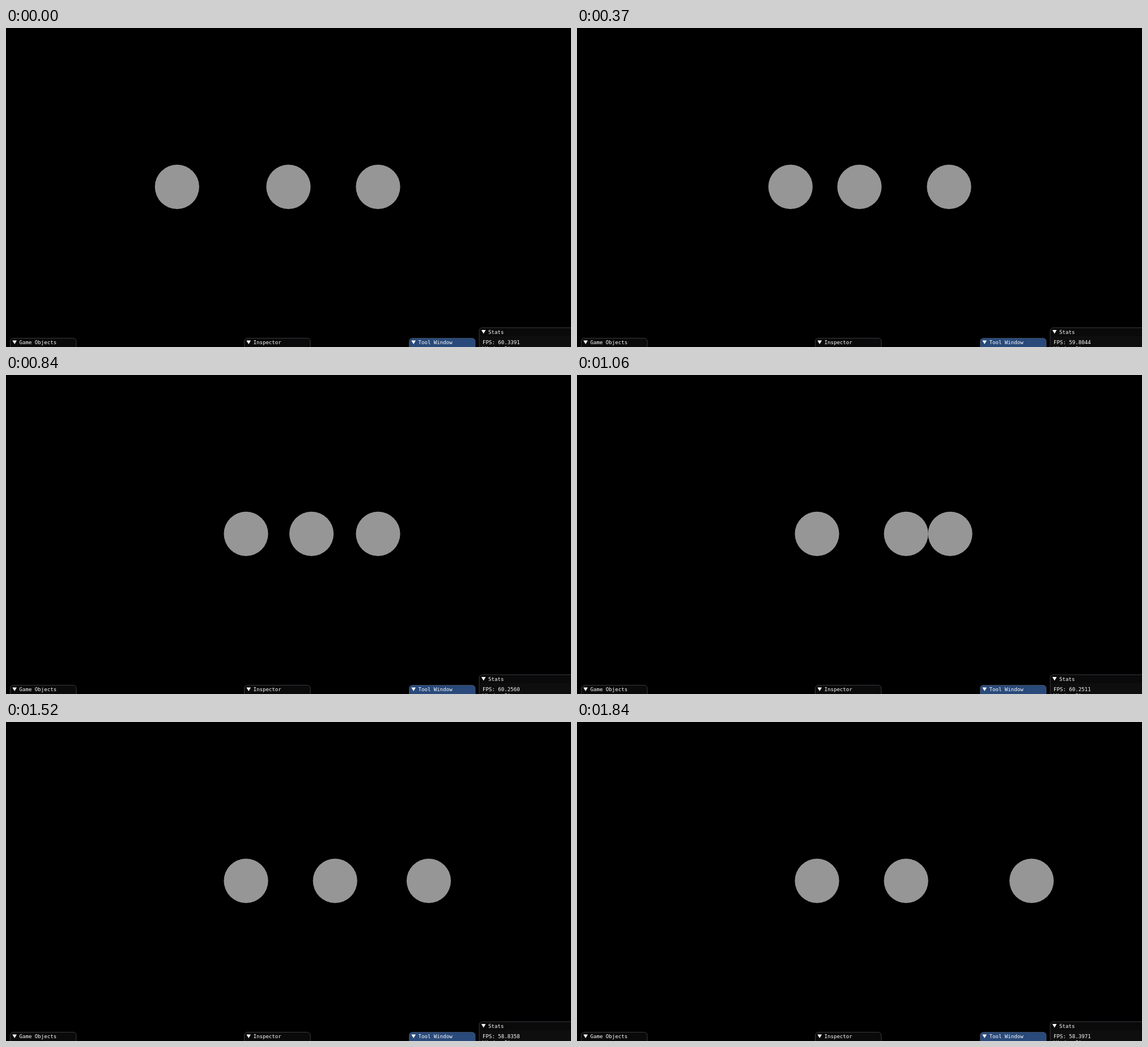
An HTML page with a canvas for the animation above (1930 ms loop, 997x562 px).

```html
<!DOCTYPE html>
<html lang="en">
<head>
<meta charset="utf-8">
<title>Collision demo</title>
<style>
html, body { margin: 0; width: 997px; height: 562px; overflow: hidden; background: #000; }
canvas { display: block; }
</style>
</head>
<body>
<canvas id="stage" width="997" height="562"></canvas>
<script>
const ctx = document.getElementById("stage").getContext("2d");
const LOOP = 1930;
const LAST = 24;     // index of the last refresh in a loop
const REFRESH = 76.5; // ms between refreshes
const STEP = 3.122;  // px moved per physics step
const RADIUS = 39.1;

const clamp = (v, lo, hi) => Math.min(hi, Math.max(lo, v));

// A ball rests at `from`, takes over the motion, and passes it on at `to`.
const balls = [
  { from: 301.8, to: 423.5 },
  { from: 498.4, to: 580.7 },
  { from: 656.5, to: 997 }
];

function rate(i) {
  const noise = Math.abs(Math.sin(i * 12.9898) * 43758.5453) % 1;
  return (60.3391 - 2.6 * noise * noise).toFixed(4);
}

function text(str, x, y) {
  ctx.fillStyle = "#fff";
  ctx.font = '9.1px "DejaVu Sans Mono", monospace';
  ctx.fillText(str, x, y);
}

function panel(title, x, y, w, fill) {
  ctx.beginPath();
  ctx.roundRect(x + 0.5, y + 0.5, w, 60, 5.5);
  ctx.fillStyle = fill;
  ctx.fill();
  ctx.strokeStyle = "rgba(110, 110, 128, 0.5)";
  ctx.stroke();
  ctx.fillStyle = "#fff";
  ctx.beginPath();
  ctx.moveTo(x + 4.3, y + 4.4);
  ctx.lineTo(x + 12, y + 4.4);
  ctx.lineTo(x + 8.15, y + 11);
  ctx.fill();
  text(title, x + 16.5, y + 11);
}

function drawBalls(i) {
  let travel = STEP * Math.round(4.67 * i + 0.3);
  ctx.fillStyle = "#969696";
  for (const { from, to } of balls) {
    ctx.beginPath();
    ctx.arc(clamp(from + travel, from, to), 279.8, RADIUS, 0, Math.PI * 2);
    ctx.fill();
    travel -= to - from;
  }
}

function draw(i) {
  ctx.fillStyle = "#000";
  ctx.fillRect(0, 0, 997, 562);
  drawBalls(i);

  panel("Game Objects", 7, 546, 116.5, "#0a0a0a");
  panel("Inspector", 420, 546, 116.5, "#0a0a0a");
  panel("Tool Window", 711, 546, 116.5, "#294a7a");
  panel("Stats", 834.5, 527.5, 180, "#0a0a0a");
  ctx.fillStyle = "#0e0e0e";
  ctx.fillRect(836, 543, 161, 19);
  text("FPS: " + rate(i), 841, 557);
  text("Window Size", 841, 568); // cut off by the stage edge
}

function frame() {
  const t = performance.now() % LOOP;
  draw(Math.min(LAST, Math.floor((t + 14) / REFRESH)));
  requestAnimationFrame(frame);
}
frame();
</script>
</body>
</html>
```
